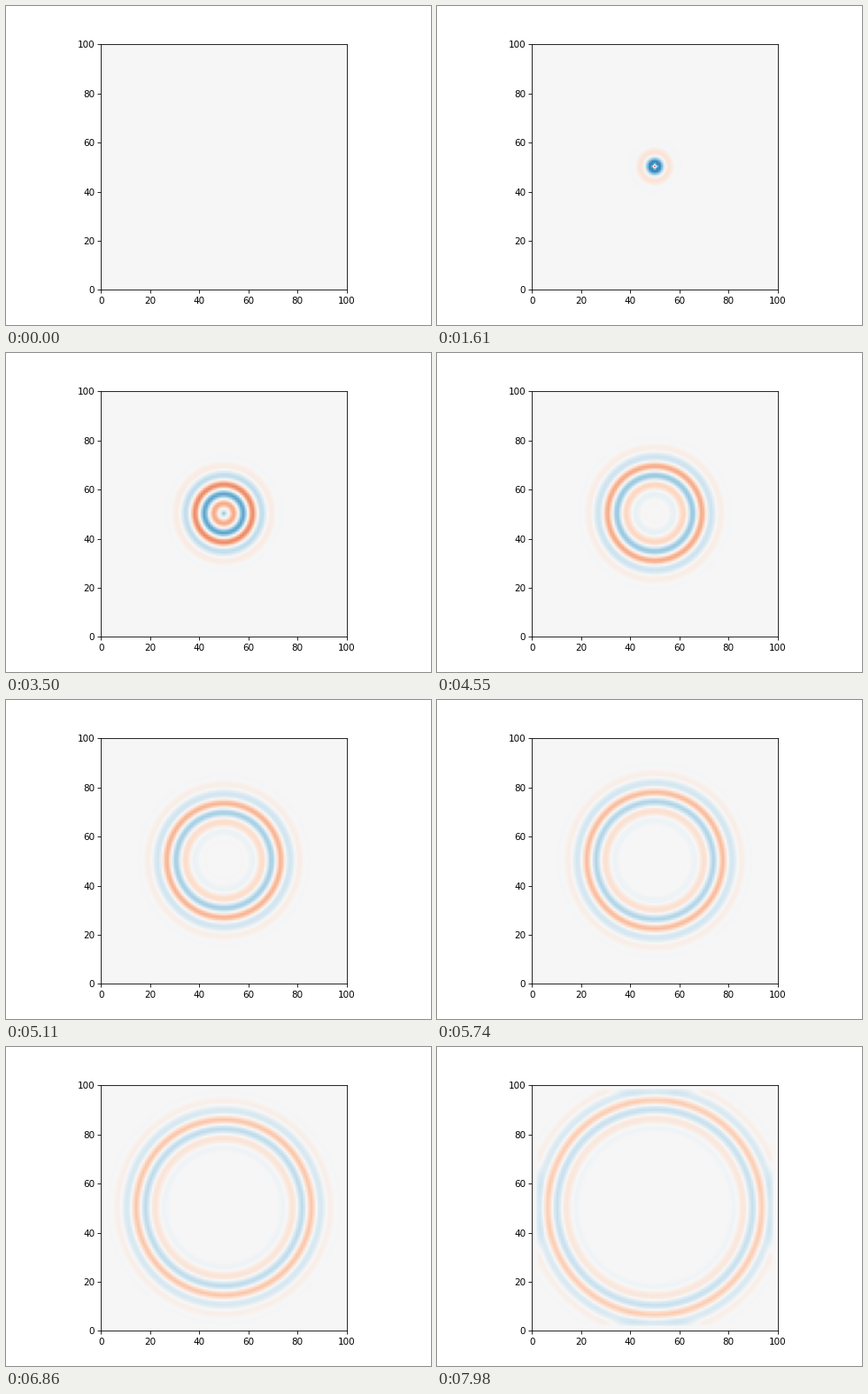
A matplotlib script for the animation above (8 s loop, 480 by 360 pixels).

```python
import numpy as np
import matplotlib.pyplot as plt
from matplotlib.animation import FuncAnimation

N = 101           # grid points per side
COURANT = 0.5
STEPS = 115
STEP_MS = 70
TICK_MS = 20
LOOP_MS = 8000
FREQ = 0.06       # carrier cycles per step
T0, SPREAD = 30, 10


def diff(a):
    """Fourth-order staggered derivative along the first axis."""
    return (27 * (a[2:-1] - a[1:-2]) - (a[3:] - a[:-3])) / 24


def pulse(t):
    envelope = np.exp(-0.5 * ((t - T0) / SPREAD) ** 2)
    return envelope * np.sin(2 * np.pi * FREQ * t)


def simulate():
    """Waves from a point source in a closed box, one field per step."""
    ez = np.zeros((N, N))
    hy = np.zeros((N - 1, N))
    hx = np.zeros((N, N - 1))
    mid = N // 2
    fields = []
    for n in range(STEPS):
        hy[1:-1] += COURANT * diff(ez)
        hx[:, 1:-1] += COURANT * diff(ez.T).T
        curl = diff(hy)[:, 2:-2] + diff(hx.T).T[2:-2]
        ez[2:-2, 2:-2] += COURANT * curl
        ez[mid, mid] += pulse(n + 0.4)
        fields.append(ez.copy())
    return fields


fields = simulate()

fig, ax = plt.subplots(figsize=(6.4, 4.8), dpi=75)
image = ax.imshow(fields[0], cmap="RdBu", vmin=-0.2, vmax=0.2,
                  origin="lower", extent=(0, 100, 0, 100),
                  interpolation="hanning")


def update(tick):
    step = (tick * TICK_MS + TICK_MS // 2) // STEP_MS
    image.set_data(fields[min(step, STEPS - 1)])
    return (image,)


anim = FuncAnimation(fig, update, frames=LOOP_MS // TICK_MS,
                     interval=TICK_MS, repeat=True, repeat_delay=0)
plt.show()
```
